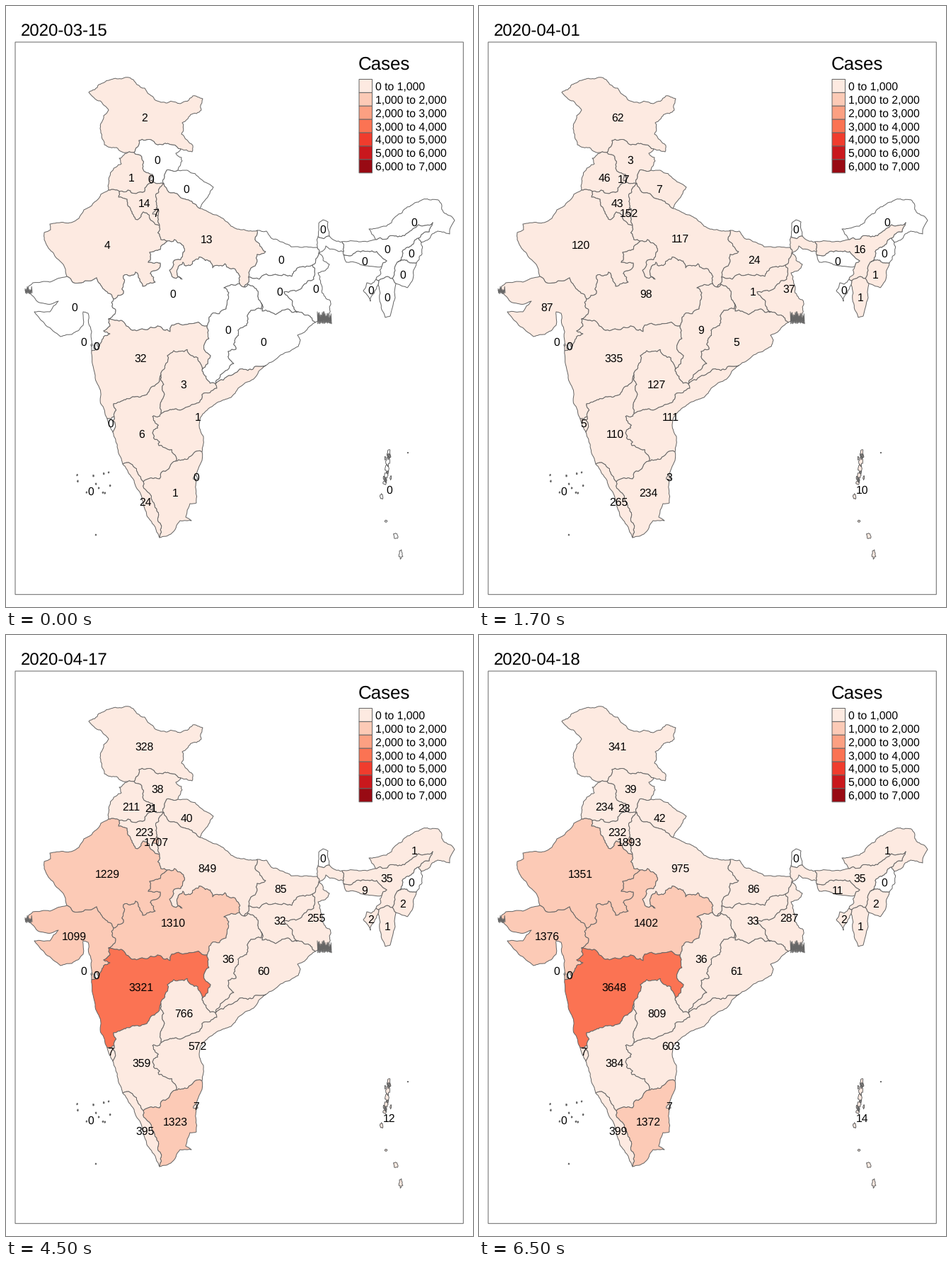
Recreate the animation shown at these times as a matplotlib script. Size 660 px wide and 849 px high, loop 8000 ms.

```python
import random

import matplotlib.pyplot as plt
import numpy as np
from matplotlib.animation import FuncAnimation
from matplotlib.patches import PathPatch, Rectangle
from matplotlib.path import Path

W, H, DPI = 660, 849, 100
STEP_MS, FRAMES = 500, 16
CHANGES = (1, 5, 9, 13)
DATES = ("2020-03-15", "2020-04-01", "2020-04-15", "2020-04-17", "2020-04-18")
REDS = ("#fdeae1", "#fccab6", "#fca082", "#fb7353", "#f03c2d", "#c9181d", "#980a13")
GREY = "#666666"
LINE = 0.72

plt.rcParams.update({"font.family": "Liberation Sans", "text.hinting": "none"})
fig = plt.figure(figsize=(W / DPI, H / DPI), dpi=DPI, facecolor="white")
ax = fig.add_axes([0, 0, 1, 1])
ax.set(xlim=(0, W), ylim=(H, 0))
ax.axis("off")

arcs = {}
regions = []


def label(x, y, text, px, ha="left"):
    return ax.text(x, y, text, fontsize=px * 72 / DPI, ha=ha, va="baseline", zorder=5)


def box(x, y, w, h, face):
    ax.add_patch(Rectangle((x, y), w, h, fc=face, ec=GREY, lw=LINE, snap=False))


def fractal(p, q, amp, rng):
    """Midpoint displacement from p up to, but without, q."""
    step = q - p
    if np.hypot(*step) < 3.5:
        return [p]
    mid = (p + q) / 2 + np.array([-step[1], step[0]]) * rng.uniform(-amp, amp)
    return fractal(p, mid, amp, rng) + fractal(mid, q, amp, rng)


def arc(name, *points, amp=0.2):
    """Store a border line, roughened between its key points."""
    rng = random.Random(name)
    pts = np.array(points, float)
    line = [v for p, q in zip(pts, pts[1:]) for v in fractal(p, q, amp, rng)]
    arcs[name] = np.array(line + [pts[-1]])


def coast(name, *points):
    arc(name, *points, amp=0.08)


def distance(p, q):
    return np.hypot(*(p - q))


def ring(names):
    """Join arcs into one closed outline, flipping each where needed."""
    lines = [arcs[n] for n in names.split()]
    first = lines[0]
    if len(lines) > 1:
        ends = lines[1][[0, -1]]
        if min(distance(first[0], e) for e in ends) < min(distance(first[-1], e) for e in ends):
            first = first[::-1]
    out = list(first)
    for line in lines[1:]:
        if distance(line[0], out[-1]) > distance(line[-1], out[-1]):
            line = line[::-1]
        out += list(line[1:])
    return np.array(out)


def blob(x, y, rx, ry):
    rng = random.Random(x * y)
    angles = np.linspace(0, 2 * np.pi, 14, endpoint=False)
    radii = np.array([rng.uniform(0.6, 1.3) for _ in angles])
    return np.column_stack([x + rx * radii * np.cos(angles), y + ry * radii * np.sin(angles)])


def region(x, y, counts, *outlines):
    rings = [ring(o) if isinstance(o, str) else o for o in outlines]
    paths = [Path(np.vstack([r, r[:1]]), closed=True) for r in rings]
    patch = PathPatch(Path.make_compound_path(*paths), ec=GREY, lw=LINE, joinstyle="round")
    ax.add_patch(patch)
    regions.append((patch, label(x, y + 5.5, "", 15.7, "center"), counts))


def creeks(x0, y0, x1, y1, n):
    """A dense zigzag of uneven height."""
    rng = random.Random(x0)
    xs = np.linspace(x0, x1, n)
    ys = [y1 - rng.uniform(0, 2) if k % 2 else rng.uniform(y0, (y0 + y1) / 2) for k in range(n)]
    ax.plot(xs, ys, color=GREY, lw=LINE, zorder=3)


# North
arc("jk_out", (172, 207), (139, 196), (133, 173), (138, 155), (145, 147), (133, 134), (117, 122),
    (131, 111), (163, 103), (174, 101), (185, 111), (196, 116), (203, 125), (219, 136),
    (246, 138), (264, 127), (278, 131), (276, 147), (249, 165), (248, 181), (264, 197),
    (263, 206), (247, 202), amp=0.14)
arc("jk_pb", (172, 207), (181, 207))
arc("jk_hp", (181, 207), (188, 190), (205, 189), (222, 196), (247, 202))
arc("hp_out", (247, 202), (240, 208), (248, 214), (243, 232))
arc("hp_pb", (181, 207), (190, 211), (193, 229), (207, 238), (208, 249))
arc("hp_uk", (243, 232), (227, 232), (223, 251))
arc("hp_hr", (208, 249), (223, 251))
arc("pb_out", (172, 207), (160, 215), (163, 223), (150, 233), (145, 245), (145, 260))
arc("pb_rj", (145, 260), (160, 262))
arc("pb_hr", (160, 262), (184, 265), (196, 262), (208, 249))
arc("hr_rj", (160, 262), (159, 270), (171, 273), (178, 291), (186, 302), (194, 291), (207, 304),
    (217, 310))
arc("hr_up", (223, 251), (212, 276), (213, 285), (216, 290), (215, 296), (217, 310))
arc("dl", (213, 285), (207, 294), (215, 296), (216, 290))
arc("uk_out", (243, 232), (256, 232), (276, 245), (293, 256), (286, 268), (274, 286), amp=0.12)
arc("uk_up", (223, 251), (230, 263), (247, 271), (258, 274), (274, 286))
coast("rj_out", (145, 260), (134, 266), (130, 273), (110, 288), (103, 300), (92, 306), (62, 308),
      (63, 316), (54, 320), (54, 330), (80, 364), (86, 382))
arc("rj_up", (217, 310), (219, 330), (228, 332))
arc("rj_mp", (228, 332), (203, 348), (201, 362), (218, 363), (217, 370), (204, 378), (211, 390),
    (193, 396), (183, 376), (166, 381), (166, 406), (152, 414))
arc("rj_gj", (86, 382), (128, 384), (131, 391), (152, 414))

# Ganges plain and centre
arc("up_out", (274, 286), (295, 295), (318, 311), (355, 317), amp=0.12)
arc("up_br", (355, 317), (352, 330), (367, 347), (355, 351), (355, 361), (343, 383))
arc("up_jh", (343, 383), (336, 397))
arc("up_cg", (336, 397), (330, 392))
arc("up_mp", (228, 332), (238, 330), (251, 341), (250, 348), (236, 362), (237, 384), (249, 386),
    (243, 371), (250, 362), (292, 370), (325, 374), (330, 392), amp=0.28)
arc("br_out", (355, 317), (368, 318), (374, 327), (392, 334), (440, 341), amp=0.12)
arc("br_jh", (343, 383), (358, 386), (404, 382), (412, 370), (433, 366))
arc("br_wb", (440, 341), (433, 366))
arc("jh_wb", (433, 366), (435, 386), (405, 402), (393, 404), (405, 417), (413, 432))
arc("jh_cg", (336, 397), (342, 393), (361, 420))
arc("jh_od", (361, 420), (362, 431), (381, 436), (413, 432))
arc("mp_cg", (330, 392), (308, 398), (315, 405), (311, 428), (290, 436), (284, 452))
arc("mp_mh", (145, 442), (157, 444), (195, 457), (232, 460), (234, 451), (284, 452))
arc("mp_gj", (152, 414), (150, 424), (155, 429), (145, 442))

# West coast
coast("gj_land", (86, 382), (62, 390), (38, 391), (27, 402))
coast("gj_sea", (27, 402), (45, 418), (64, 421), (74, 417), (62, 432), (40, 432), (56, 451),
      (77, 467), (93, 464), (109, 451), (109, 432), (116, 434), (121, 487))
arc("gj_mh", (145, 442), (147, 452), (138, 459), (147, 463), (134, 476), (121, 487))
coast("mh_sea", (121, 487), (131, 537), (143, 583))
arc("mh_ga", (143, 583), (153, 580))
arc("ga_ka", (153, 580), (151, 602))
coast("ga_sea", (143, 583), (151, 602))
arc("mh_ka", (153, 580), (152, 562), (179, 552), (210, 537), (219, 521))
arc("mh_ts", (219, 521), (226, 505), (237, 487), (271, 497), (277, 514))
arc("mh_cg", (277, 514), (289, 494), (281, 487), (284, 452))

# East and south
arc("cg_od", (361, 420), (361, 428), (346, 430), (328, 458), (325, 485), (314, 488), (322, 505),
    (303, 521), (296, 534))
arc("cg_ts", (277, 514), (296, 534))
arc("ts_ka", (219, 521), (219, 576))
arc("ts_ap", (219, 576), (246, 571), (268, 562), (277, 549), (298, 540), (296, 534))
arc("od_ap", (296, 534), (318, 522), (342, 515), (367, 508))
coast("od_sea", (367, 508), (388, 493), (413, 481), (416, 472), (412, 465), (437, 447))
arc("od_wb", (413, 432), (437, 447))
coast("ap_sea", (367, 508), (350, 527), (328, 540), (318, 553), (291, 566), (275, 581),
      (273, 592), (279, 608), (277, 630))
arc("ka_ap", (219, 576), (207, 580), (208, 605), (216, 621), (228, 626), (240, 643), amp=0.32)
arc("ap_tn", (240, 643), (257, 640), (277, 630))
arc("ka_tn", (194, 672), (217, 668), (222, 657), (240, 643))
coast("ka_sea", (151, 602), (157, 619), (165, 647))
arc("ka_kl", (165, 647), (194, 672))
coast("kl_sea", (165, 647), (184, 680), (199, 720), (217, 751))
arc("kl_tn", (194, 672), (197, 683), (207, 700), (215, 722), (217, 751))
coast("tn_sea", (277, 630), (277, 642), (269, 666), (269, 702), (260, 703), (254, 722),
      (262, 727), (246, 727), (233, 746), (217, 751))

# North-east
arc("wb_neck", (440, 341), (441, 326))
arc("wb_sk", (441, 326), (457, 325))
arc("wb_bt", (457, 325), (475, 333))
arc("wb_as", (475, 333), (477, 347))
arc("wb_bd", (477, 347), (452, 339), (443, 350), (457, 365), (441, 377), (447, 400), (457, 415),
    (460, 448))
arc("wb_sea", (460, 448), (437, 447))
arc("sk", (441, 326), (442, 307), (448, 302), (455, 305), (457, 325), amp=0.1)
coast("as_bt", (475, 333), (522, 330))
arc("as_ar", (522, 330), (549, 325), (567, 321), (583, 309), (603, 306), (598, 319), (583, 328))
arc("ar_out", (522, 330), (513, 315), (545, 306), (560, 292), (583, 277), (612, 275), (618, 291),
    (634, 303), (627, 322), (610, 318), (587, 334), amp=0.16)
arc("ar_nl", (583, 328), (587, 334))
arc("as_nl", (583, 328), (560, 347), (553, 362))
arc("nl_out", (587, 334), (588, 350), (580, 363))
arc("nl_mn", (553, 362), (580, 363))
coast("mn_out", (580, 363), (575, 386), (567, 398), (551, 392))
arc("mn_mz", (551, 392), (546, 385))
arc("as_mn", (553, 362), (546, 385))
arc("as_mz", (546, 385), (527, 388))
coast("mz_out", (551, 392), (550, 412), (543, 438), (536, 440), (526, 394))
arc("tr_mz", (527, 388), (526, 394))
arc("tr_out", (526, 394), (515, 417), (505, 402), (510, 391), (516, 393), (523, 386), amp=0.14)
arc("as_tr", (523, 386), (527, 388))
arc("as_bd", (523, 386), (531, 368))
arc("as_ml", (477, 351), (505, 346), (528, 352), (538, 360), (531, 368))
coast("ml_bd", (477, 351), (481, 362), (508, 367), (531, 368))
arc("as_west", (477, 347), (477, 351))

NONE = (0,) * len(DATES)
region(195.5, 157, (2, 62, 300, 328, 341), "jk_out jk_hp jk_pb")
region(214, 217, (0, 3, 35, 38, 39), "jk_hp hp_out hp_uk hp_hr hp_pb")
region(177, 242, (1, 46, 186, 211, 234), "jk_pb hp_pb pb_hr pb_rj pb_out")
region(255, 258, (0, 7, 37, 40, 42), "uk_out uk_up hp_uk")
region(195.5, 278.5, (14, 43, 204, 223, 232), "pb_hr hp_hr hr_up hr_rj")
region(205, 244.5, (0, 17, 21, 21, 23), blob(206, 244, 2, 3))
region(212, 292, (7, 152, 1578, 1707, 1893), "dl")
region(143.5, 337, (4, 120, 1076, 1229, 1351), "rj_out rj_gj rj_mp rj_up hr_rj pb_rj")
region(284, 329, (13, 117, 735, 849, 975), "uk_up up_out up_br up_jh up_cg up_mp rj_up hr_up")
region(388.5, 358, (0, 24, 72, 85, 86), "br_out br_wb br_jh up_br")
region(448, 315.5, NONE, "sk wb_sk")
region(577, 305, (0, 0, 1, 1, 1), "ar_out ar_nl as_ar")
region(538.5, 343, (0, 16, 33, 35, 35),
       "as_bt as_ar as_nl as_mn as_mz as_tr as_bd as_ml as_west wb_as")
region(572.5, 349.5, NONE, "as_nl ar_nl nl_out nl_mn")
region(507, 360.5, (0, 0, 7, 9, 11), "as_ml ml_bd")
region(560.5, 379, (0, 1, 2, 2, 2), "nl_mn mn_out mn_mz as_mn")
region(516, 401.5, (0, 0, 2, 2, 2), "tr_out as_tr tr_mz")
region(539, 411, (0, 1, 1, 1, 1), "as_mz mn_mz mz_out tr_mz")
region(387, 403, (0, 1, 28, 32, 33), "br_jh jh_wb jh_od jh_cg up_jh")
region(438, 399.5, (0, 37, 213, 255, 287),
       "wb_neck wb_sk wb_bt wb_as wb_bd wb_sea od_wb jh_wb br_wb")
region(96.5, 425, (0, 87, 766, 1099, 1376), "gj_land gj_sea gj_mh mp_gj rj_gj")
region(236, 406.5, (0, 98, 938, 1310, 1402), "rj_mp up_mp mp_cg mp_mh mp_gj")
region(314, 457, (0, 9, 33, 36, 36), "up_cg jh_cg cg_od cg_ts mh_cg mp_cg")
region(363.5, 474, (0, 5, 60, 60, 61), "jh_od od_wb od_sea od_ap cg_od")
region(190.5, 497.5, (32, 335, 2916, 3321, 3648), "mp_mh mh_cg mh_ts mh_ka mh_ga mh_sea gj_mh")
region(110, 474, NONE, blob(121, 479, 1, 1.5))
region(127.5, 480.5, NONE, blob(127, 481, 3, 4))
region(251, 534.5, (3, 127, 650, 766, 809), "mh_ts cg_ts ts_ap ts_ka")
region(271, 580.5, (1, 111, 525, 572, 603), "ts_ap od_ap ap_sea ap_tn ka_ap")
region(147.5, 589, (0, 5, 7, 7, 7), "mh_ga ga_ka ga_sea")
region(192, 604, (6, 110, 279, 359, 384), "mh_ka ts_ka ka_ap ka_tn ka_kl ka_sea ga_ka")
region(239, 687.5, (1, 234, 1242, 1323, 1372), "ap_tn tn_sea kl_tn ka_tn")
region(197, 700, (24, 265, 387, 395, 399), "ka_kl kl_tn kl_sea")
region(269, 665.5, (0, 3, 7, 7, 7), blob(268, 666, 3, 4))

# Island groups
rng = random.Random(5)
atolls = [blob(rng.uniform(100, 150), rng.uniform(655, 690), 0.8, 1.1) for _ in range(11)]
region(120, 685.5, NONE, *atolls, blob(127, 747, 0.8, 0.8))

chain = [blob(541 - 1.4 * k, 633 + 10 * k, 2.5, 7 - k) for k in range(5)]
slivers = [blob(rng.uniform(534, 544), rng.uniform(630, 672), 1, 2.5) for _ in range(8)]
nicobar = [blob(537, 728, 1.5, 1.5), blob(551, 748, 3, 4), blob(558, 775, 2.6, 5.5)]
region(541.5, 683, (0, 10, 11, 12, 14), *chain, *slivers, blob(531, 693, 2, 4),
       blob(568, 631, 0.6, 0.6), *nicobar)

creeks(440, 431, 460, 449, 30)
creeks(27, 396, 37, 407, 14)

box(13, 51, 633.3, 780.3, "none")
title = label(20.5, 42.5, "", 24)
label(497.5, 89.5, "Cases", 25.9)
for k, color in enumerate(REDS):
    box(499, 103.5 + 18.9 * k, 18.5, 18.9, color)
    label(522, 119 + 18.85 * k, f"{1000 * k:,} to {1000 * (k + 1):,}", 15.7)


def update(frame):
    day = sum(frame >= c for c in CHANGES)
    title.set_text(DATES[day])
    for patch, text, counts in regions:
        count = counts[day]
        patch.set_facecolor(REDS[count // 1000] if count else "white")
        text.set_text(str(count))
    return []


anim = FuncAnimation(fig, update, frames=FRAMES, interval=STEP_MS, repeat=True, repeat_delay=0)
plt.show()
```
